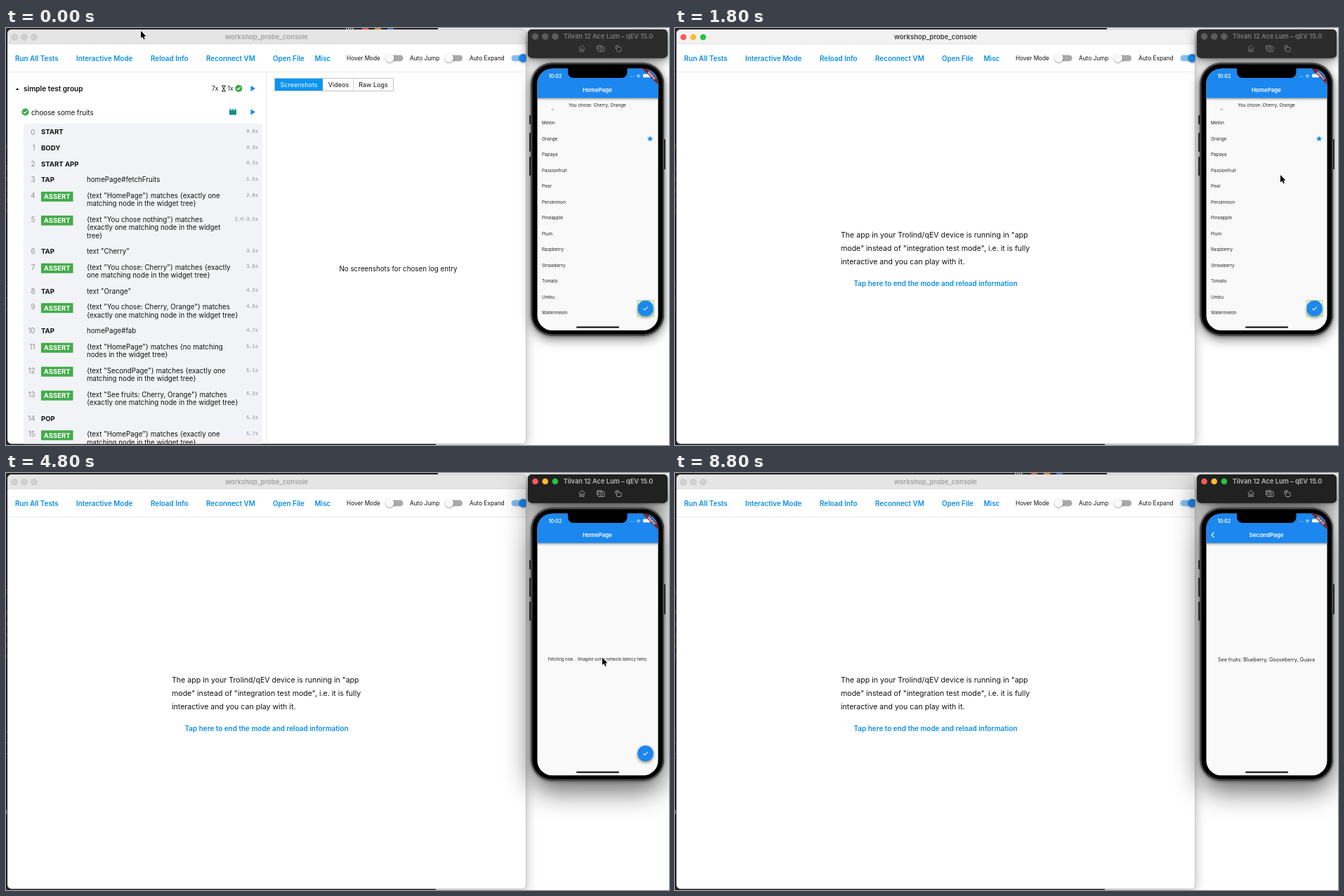
Animation, 944 px wide and 593 px high, one loop 8.9 s. Source, as an HTML page with a canvas:

```html
<!DOCTYPE html>
<html lang="en">
<head>
<meta charset="utf-8">
<title>Test runner demo</title>
<style>
html, body { margin: 0; width: 100%; height: 100%; overflow: hidden; background: #fff; }
canvas { display: block; width: 944px; height: 593px; }
</style>
</head>
<body>
<canvas id="stage"></canvas>
<script>
const W = 944, H = 593, LOOP = 8900;
const canvas = document.getElementById('stage');
const c = canvas.getContext('2d');
const dpr = window.devicePixelRatio || 1;
canvas.width = W * dpr;
canvas.height = H * dpr;

const SANS = 'Inter, Roboto, sans-serif', MONO = '"Liberation Mono", monospace';
const LINK = '#0b8ee6', BLUE = '#1b87ef', GREEN = '#43ab4b', PAGE = '#f9f9f9';

// Times of the hard changes, in ms
const T = { press: 750, mode: 850, toastEnd: 1500, restart: 2900,
  focus: 3800, fetch: 4000, list: 5000, fab: 7450, push: 7600 };
const PICKS = [[5850, 'Blueberry', 852], [6400, 'Gooseberry', 854], [6900, 'Guava', 856]];
const PATH = [[0, 192, 4], [100, 192, 4], [650, 140, 46], [1100, 140, 46], [1800, 862, 209],
  [2100, 862, 209], [2700, 846, 263], [4000, 846, 263], [4200, 849, 262.5], [4800, 849, 262.5],
  [5550, 852, 213], [5950, 852, 213], [6300, 854, 303], [6500, 854, 303], [6800, 856, 371],
  [7000, 856, 371], [7400, 910, 398], [7750, 910, 398], [8350, 505, -18]];

const FRUITS = ('Apple Apricot Banana Blackberry Blueberry Cherry Durian Fig Gooseberry Grapes ' +
  'GreenApple Guava Kiwi Lemon Mango Melon Orange Papaya Passionfruit Pear Persimmon ' +
  'Pineapple Plum Raspberry Strawberry Tomato Umbu Watermelon').split(' ');
const ROW = 22.5, FIRST = 126.3, SCROLLED = 328.8;

const LOG = [
  ['START', '0.0s'], ['BODY', '0.3s'], ['START APP', '0.3s'],
  ['TAP', '1.5s', 'homePage#fetchFruits'],
  ['ASSERT', '2.0s', '{text "HomePage"} matches {exactly one', 'matching node in the widget tree}'],
  ['ASSERT', '2.0-3.2s', '{text "You chose nothing"} matches', '{exactly one matching node in the widget', 'tree}'],
  ['TAP', '3.3s', 'text "Cherry"'],
  ['ASSERT', '3.8s', '{text "You chose: Cherry"} matches {exactly', 'one matching node in the widget tree}'],
  ['TAP', '4.2s', 'text "Orange"'],
  ['ASSERT', '4.6s', '{text "You chose: Cherry, Orange"} matches', '{exactly one matching node in the widget tree}'],
  ['TAP', '4.7s', 'homePage#fab'],
  ['ASSERT', '5.1s', '{text "HomePage"} matches {no matching', 'nodes in the widget tree}'],
  ['ASSERT', '5.1s', '{text "SecondPage"} matches {exactly one', 'matching node in the widget tree}'],
  ['ASSERT', '5.2s', '{text "See fruits: Cherry, Orange"} matches', '{exactly one matching node in the widget tree}'],
  ['POP', '5.2s'],
  ['ASSERT', '5.7s', '{text "HomePage"} matches {exactly one', 'matching node in the widget tree}']
];

const clamp = v => Math.max(0, Math.min(1, v));
const ease = p => p * p * (3 - 2 * p);

// y is the middle of the capital letters
function text(s, x, y, size, color = '#111', weight = 400, align = 'left', family = SANS) {
  c.font = `${weight} ${size}px ${family}`;
  c.textAlign = align;
  c.fillStyle = color;
  c.fillText(s, x, y + size * 0.36);
}
function rect(x, y, w, h, color) {
  c.fillStyle = color;
  c.fillRect(x, y, w, h);
}
function roundPath(x, y, w, h, r) {
  c.beginPath();
  c.roundRect(x, y, w, h, r);
}
function box(x, y, w, h, r, color) {
  roundPath(x, y, w, h, r);
  c.fillStyle = color;
  c.fill();
}
function dot(x, y, r, color) {
  c.beginPath();
  c.arc(x, y, r, 0, 7);
  c.fillStyle = color;
  c.fill();
}
function poly(points, close) {
  c.beginPath();
  points.forEach(([x, y]) => c.lineTo(x, y));
  if (close) c.closePath();
}
function fillPoly(points, color) {
  poly(points, true);
  c.fillStyle = color;
  c.fill();
}
function line(points, color, width) {
  poly(points);
  c.strokeStyle = color;
  c.lineWidth = width;
  c.stroke();
}
function shadowed(color, blur, dy, draw) {
  c.save();
  c.shadowColor = color;
  c.shadowBlur = blur * dpr;
  c.shadowOffsetY = dy * dpr;
  draw();
  c.restore();
}
function clipped(makePath, draw) {
  c.save();
  makePath();
  c.clip();
  draw();
  c.restore();
}
function tick(x, y, s, color, width) {
  line([[x - s, y], [x - s * 0.3, y + s * 0.7], [x + s, y - s * 0.7]], color, width);
}
function lights(x, y, step, active, idle, rim) {
  ['#fc5b57', '#fdbc2e', '#27c33f'].forEach((col, i) => {
    dot(x + i * step, y, 4.3, active ? col : idle);
    if (active) return;
    c.strokeStyle = rim;
    c.lineWidth = 0.7;
    c.stroke();
  });
}

function backdrop(t) {
  rect(0, 0, W, H, '#fff');
  rect(0, 0, 615, 300, '#292929');
  rect(0, 300, 612, 293, '#292929');
  if (t < 1400 || t >= 8200) {
    for (let i = 0; i < 4; i++) rect(484 + i * 3, 0, 1.5, 2, '#ddd');
    rect(507, 0, 9, 2, '#e8664a');
    rect(525, 0, 9, 2, '#e99a3c');
    rect(543, 0, 9, 2, '#4f86d8');
  }
  [168, 198, 214, 230, 245, 260].forEach(y => text('c', -3.2, y, 9, '#c98b3c', 400, 'left', MONO));
  [367, 383, 399].forEach(y => rect(0, y, 1.5, 1, '#777'));
  if (t >= 1900) rect(0, 479, 1.2, 6, '#999');
}

function toggle(x, on) {
  box(x, 38.6, 21, 8.6, 4.3, on ? '#83c0f4' : '#a9a9a9');
  shadowed('rgba(0,0,0,.4)', 2.5, 1, () => dot(on ? x + 17 : x + 2, 42.8, 6, on ? BLUE : '#fafafa'));
}

function toolbar(t) {
  if (t >= 500 && t < 1250) {
    clipped(() => roundPath(94, 33, 92, 20, 3), () => {
      rect(94, 33, 92, 20, 'rgba(33,150,243,.04)');
      const p = (t - T.press) / 500;
      if (p > 0) dot(141, 46, 12 + 36 * clamp(p), `rgba(33,150,243,${0.16 * (1 - clamp(p * 1.6 - 0.6))})`);
    });
  }
  [['Run All Tests', 13], ['Interactive Mode', 100], ['Reload Info', 206], ['Reconnect VM', 285],
    ['Open File', 380], ['Misc', 439.5]].forEach(([s, x]) => text(s, x, 43, 9.9, LINK, 600));
  [['Hover Mode', 485, 544.5], ['Auto Jump', 575, 629], ['Auto Expand', 660, 719.5]].forEach(([s, x, sx], i) => {
    text(s, x, 43, 8.25);
    toggle(sx, i === 2);
  });
  rect(2, 62, 738, 1, '#e9e9e9');
}

function play(y) {
  fillPoly([[348.5, y - 4], [355, y], [348.5, y + 4]], BLUE);
}
function badge(x, y) {
  dot(x, y, 5, '#38a845');
  tick(x, y, 2.5, '#fff', 1.2);
}

function testLog() {
  fillPoly([[13.8, 88], [16.2, 85.2], [18.6, 88]], '#111');
  text('simple test group', 25, 86.5, 10.1, '#111', 600);
  text('7x', 293, 86, 8.6);
  c.strokeStyle = '#222';
  c.lineWidth = 1;
  poly([[307.5, 82], [312.5, 82], [307.5, 90], [312.5, 90]], true);
  c.stroke();
  text('1x', 315.5, 86, 8.6);
  badge(331.3, 86);
  play(86);
  badge(27.5, 119.5);
  text('choose some fruits', 36, 120, 9.8);
  rect(318, 117, 10, 6.5, '#0a9187');
  for (let i = 0; i < 3; i++) rect(318 + i * 3.6, 115.2, 2.6, 1.4, '#0a9187');
  play(119.5);

  box(25, 136, 340, 470, 4, '#f2f3f6');
  let y = 148;
  LOG.forEach(([kind, time, ...lines], i) => {
    text(i, 41.5, y, 9.75, '#8b8b8b', 400, 'right');
    if (kind === 'ASSERT') {
      rect(50, y - 5.6, 45.5, 14, GREEN);
      text(kind, 72.7, y + 1.3, 9.5, '#fff', 700, 'center');
    } else text(kind, 50, y, 9.6, '#111', 700);
    lines.forEach((s, n) => text(s, 115, y + n * 11.35, 9.75));
    text(time, 359, y - 1.3, 7, '#888', 400, 'right', MONO);
    y += 22.6 + 11.35 * Math.max(0, lines.length - 1);
  });

  rect(370.5, 63, 1, 530, '#e6e6e6');
  rect(383, 72, 68, 17.5, '#0b95f3');
  c.strokeStyle = '#c4c4c4';
  c.lineWidth = 1;
  c.strokeRect(382.5, 71.5, 169, 18);
  rect(494.5, 72, 1, 17, '#d0d0d0');
  text('Screenshots', 417, 81, 9, '#fff', 400, 'center');
  text('Videos', 473.5, 81, 9, '#111', 400, 'center');
  text('Raw Logs', 523, 81, 9, '#111', 400, 'center');
  text('No screenshots for chosen log entry', 558.5, 342, 9.75, '#111', 400, 'center');
}

function appMode(t) {
  ['The app in your Trolind/qEV device is running in "app',
    'mode" instead of "integration test mode", i.e. it is fully',
    'interactive and you can play with it.'].forEach((s, i) => text(s, 236, 293.7 + i * 19, 10.6));
  text('Tap here to end the mode and reload information', 371, 363.7, 9.95, LINK, 600, 'center');
  if (t < T.toastEnd) {
    box(319, 56.5, 104, 19, 2, GREEN);
    text('Worker Restarting...', 371, 66, 9.75, '#fff', 400, 'center');
  }
}

function manager(t) {
  const active = t >= T.press && t < T.focus;
  shadowed('rgba(0,0,0,.3)', 16, 4, () => box(2, 2, 738.5, 589.5, 6, '#fff'));
  clipped(() => roundPath(2, 2, 738.5, 589.5, 6), () => {
    rect(2, 2, 739, 21, active ? '#f3f2f3' : '#e6e5e6');
    rect(2, 22.5, 739, 0.6, '#d6d6d6');
    lights(12, 13, 14, active, '#d2d1d2', '#b9b8b9');
    text('workshop_probe_console', 371, 13, 9.5, active ? '#3c3c3c' : '#a0a0a0', 600, 'center');
    toolbar(t);
    if (t < T.mode) testLog();
    else appMode(t);
  });
  roundPath(2, 2, 738.5, 589.5, 6);
  c.strokeStyle = 'rgba(0,0,0,.25)';
  c.lineWidth = 0.6;
  c.stroke();
}

// The bar and the phone are one window, so they share one shadow
function deviceShadow(active) {
  const shape = () => {
    roundPath(743, 2, 199, 40.5, 6);
    c.roundRect(747.5, 49.5, 189.5, 388, 30);
    c.fillStyle = '#333';
    c.fill();
  };
  if (active) shadowed('rgba(0,0,0,.62)', 38, 14, shape);
  else shadowed('rgba(0,0,0,.5)', 16, 5, shape);
  shadowed('rgba(0,0,0,.4)', 4, 1, shape);
}

function deviceBar(active) {
  box(743, 2, 199, 40.5, 6, active ? '#212121' : '#2c2c2c');
  lights(753.5, 12, 14.2, active, '#5b5b5b', '#666');
  text('Tilvan 12 Ace Lum – qEV 15.0', 857.5, 12, 9.2, active ? '#bcbcbc' : '#7b7b7b', 600, 'center');
  const ink = active ? '#9a9a9a' : '#737373';
  line([[815.5, 29], [820, 24.5], [824.5, 29]], ink, 1);
  line([[817, 28.5], [817, 33.5], [819, 33.5], [819, 30], [821, 30], [821, 33.5], [823, 33.5], [823, 28.5]], ink, 1);
  roundPath(843, 26.5, 9, 7, 1);
  c.stroke();
  line([[841.5, 31], [841.5, 25], [849, 25]], ink, 1);
  c.beginPath();
  c.arc(847.5, 30, 2, 0, 7);
  c.stroke();
  roundPath(869.5, 27.5, 6.5, 6, 1);
  c.stroke();
  line([[868, 30], [868, 25.5], [872, 25.5]], ink, 1);
  line([[870.5, 24], [872, 25.5], [870.5, 27]], ink, 1);
}

function star(x, y) {
  const pts = [];
  for (let i = 0; i < 10; i++) {
    const r = i % 2 ? 1.9 : 4.6, a = i * Math.PI / 5 - Math.PI / 2;
    pts.push([x + r * Math.cos(a), y + r * Math.sin(a)]);
  }
  fillPoly(pts, BLUE);
}

function appBar(title) {
  shadowed('rgba(0,0,0,.4)', 3, 1, () => rect(756, 57, 173, 42.5, BLUE));
  text(title, 842, 88, 8, '#fff', 600, 'center');
}

function fruitList(t, picks, scroll) {
  text(`You chose: ${picks.length ? picks.join(', ') : 'nothing'}`, 842, 109.7, 6.4, '#222', 400, 'center');
  clipped(() => { c.beginPath(); c.rect(756, 115, 173, 316); }, () => {
    FRUITS.forEach((name, i) => {
      const y = FIRST + i * ROW - scroll;
      if (y < 100 || y > 445) return;
      const pick = PICKS.find(p => p[1] === name);
      const p = pick ? (t - pick[0] + 60) / 450 : -1;
      if (p > 0 && p < 1) {
        clipped(() => { c.beginPath(); c.rect(756, y - ROW / 2, 173, ROW); }, () => {
          const fade = 1 - clamp(p * 2 - 1);
          rect(756, y - ROW / 2, 173, ROW, `rgba(0,0,0,${0.05 * fade})`);
          dot(pick[2], y, 10 + 110 * p, `rgba(0,0,0,${0.07 * fade})`);
        });
      }
      text(name, 763, y, 6.4, '#222');
      if (picks.includes(name)) star(917, y);
    });
  });
}

function fab(t) {
  const pressed = t >= T.fab;
  shadowed('rgba(0,0,0,.45)', pressed ? 7 : 4, pressed ? 3 : 2, () => dot(910.5, 398.7, 11.3, BLUE));
  if (pressed) dot(910.5, 398.7, 11.3, 'rgba(255,255,255,.12)');
  tick(910.5, 398.8, 3.2, '#fff', 1.1);
  if (t < T.restart) {
    c.strokeStyle = 'rgba(130,200,90,.8)';
    c.lineWidth = 1;
    c.strokeRect(899.5, 387.5, 22.5, 22.5);
  }
}

function homePage(t) {
  rect(756, 57, 173, 374, PAGE);
  if (t < T.restart) fruitList(t, ['Cherry', 'Orange'], SCROLLED);
  else if (t < T.fetch) text('Tap to fetch fruits', 842, 264.7, 5.6, LINK, 500, 'center');
  else if (t < T.list) text('Fetching now... (Imagine some network latency here)', 842, 264.7, 5.65, '#222', 400, 'center');
  else fruitList(t, PICKS.filter(p => t >= p[0]).map(p => p[1]), 0);
  appBar('HomePage');
  fab(t);
}

function secondPage() {
  rect(756, 57, 173, 374, PAGE);
  text('See fruits: Blueberry, Gooseberry, Guava', 842, 265.7, 7.15, '#222', 400, 'center');
  appBar('SecondPage');
  line([[767.5, 84.5], [764, 88], [767.5, 91.5]], '#fff', 1.2);
}

function statusBar() {
  text('10:02', 772.5, 68, 7, '#fff', 600);
  for (let i = 0; i < 4; i++) dot(888.5 + i * 1.8, 69, 0.5, 'rgba(255,255,255,.7)');
  c.strokeStyle = '#fff';
  c.lineWidth = 1;
  [1.6, 3.6].forEach(r => {
    c.beginPath();
    c.arc(900.5, 70.5, r, -2.35, -0.79);
    c.stroke();
  });
  dot(900.5, 70, 0.7, '#fff');
  box(907, 65.6, 10, 4.6, 1.2, '#fff');
  c.save();
  c.translate(929, 58);
  c.rotate(Math.PI / 4);
  rect(-17, 11.3, 34, 4.9, 'rgba(128,28,32,.9)');
  text('DEBUG', 0, 13.8, 4.1, '#fff', 800, 'center');
  c.restore();
}

function phone(t) {
  [[745, 124, 13], [745, 149, 27], [745, 183, 27], [935.8, 158, 43]].forEach(([x, y, h]) => box(x, y, 3.2, h, 1, '#2b2b2b'));
  box(747.5, 49.5, 189.5, 388, 30, '#4a4a4a');
  box(749.5, 51.5, 185.5, 384, 28, '#000');
  clipped(() => roundPath(756.5, 57.8, 172, 372.2, 21), () => {
    const p = clamp((t - T.push) / 450), slide = 1 - Math.pow(1 - p, 3);
    if (p < 1) {
      c.save();
      c.translate(-58 * slide, 0);
      homePage(t);
      c.restore();
    }
    if (p > 0) {
      c.save();
      c.translate(173 * (1 - slide), 0);
      secondPage();
      c.restore();
    }
    statusBar();
    box(812, 424.6, 61, 2, 1, '#000');
  });
  box(800, 52, 84.5, 19, [0, 0, 8, 8], '#000');
}

function cursorAt(t) {
  let i = 0;
  while (i < PATH.length - 2 && t >= PATH[i + 1][0]) i++;
  const [t0, x0, y0] = PATH[i], [t1, x1, y1] = PATH[i + 1];
  const p = ease(clamp((t - t0) / (t1 - t0)));
  return [x0 + (x1 - x0) * p, y0 + (y1 - y0) * p];
}

function cursor(t) {
  const [x, y] = cursorAt(t);
  const overLink = t < 1800 && x > 94 && x < 186 && y > 33 && y < 54;
  c.save();
  c.translate(x, y);
  c.lineJoin = 'round';
  if (overLink) {
    poly([[1.6, 2], [3, 1.6], [4, 6], [5, 5.2], [6, 6.2], [7, 5.8], [8, 6.8], [9, 7], [9, 10],
      [7.8, 14], [3, 14], [-0.6, 9.4], [0.2, 8.4], [2.4, 10]], true);
    c.fillStyle = '#fff';
    c.strokeStyle = '#111';
    c.lineWidth = 1.1;
  } else {
    poly([[0, 0], [0, 10.6], [2.4, 8.5], [4.1, 12.2], [5.8, 11.4], [4.2, 7.9], [7.4, 7.7]], true);
    c.fillStyle = '#000';
    c.strokeStyle = '#fff';
    c.lineWidth = 1.5;
  }
  c.stroke();
  c.fill();
  if (overLink) c.stroke();
  c.restore();
}

function draw(t) {
  const deviceActive = t >= T.focus;
  c.setTransform(dpr, 0, 0, dpr, 0, 0);
  backdrop(t);
  manager(t);
  deviceShadow(deviceActive);
  phone(t);
  deviceBar(deviceActive);
  cursor(t);
}

const start = performance.now();
function tickFrame() {
  draw((performance.now() - start) % LOOP);
  requestAnimationFrame(tickFrame);
}
tickFrame();
</script>
</body>
</html>
```
